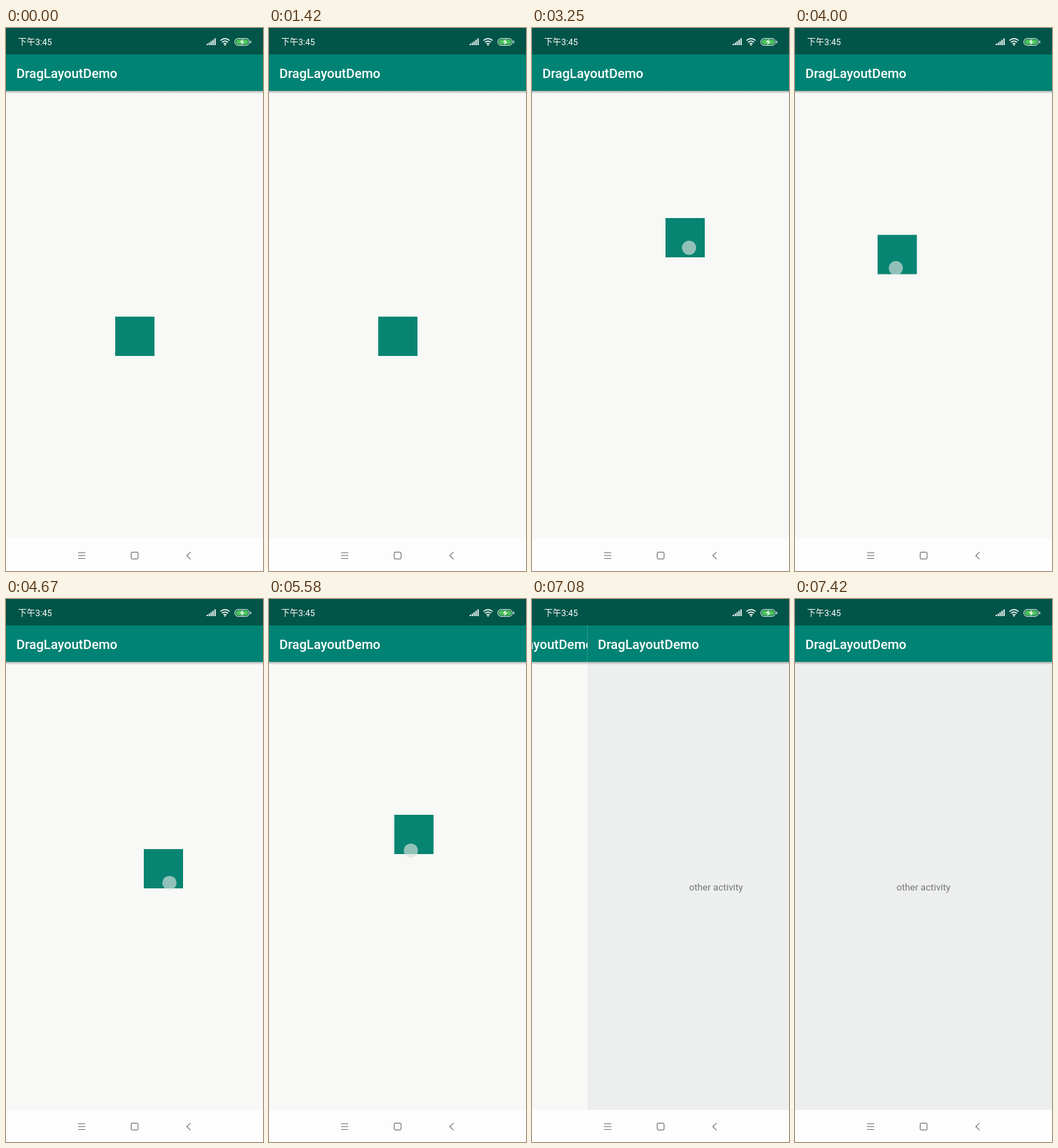
Animation, 360 px wide and 760 px high, one loop 8000 ms. Source, as an HTML page:

```html
<!DOCTYPE html>
<html lang="en">
<head>
<meta charset="utf-8">
<title>DragLayoutDemo</title>
<style>
  html, body { margin: 0; width: 100%; height: 100%; overflow: hidden; }
  svg { display: block; width: 360px; height: 760px; }
  text { font-family: Roboto, "Noto Sans CJK SC", "Noto Sans CJK", sans-serif; }
  .title { font-size: 18.3px; font-weight: 500; fill: #fff; }
  .time { font-size: 12px; fill: #fff; }
  .label { font-size: 13.2px; fill: #767676; text-anchor: middle; }
  .line { fill: none; stroke: #7c7c7e; stroke-width: 1.2; }
</style>
</head>
<body>
<svg viewBox="0 0 360 760">
  <defs>
    <linearGradient id="shade" x2="0" y2="1">
      <stop stop-color="#444" stop-opacity=".4"/>
      <stop offset="1" stop-color="#444" stop-opacity="0"/>
    </linearGradient>
    <g id="appBar">
      <rect y="88" width="360" height="4" fill="url(#shade)"/>
      <rect y="37" width="360" height="51" fill="#008374"/>
      <text class="title" x="14.5" y="70">DragLayoutDemo</text>
    </g>
  </defs>

  <g id="main">
    <rect width="360" height="760" fill="#f8f8f6"/>
    <use href="#appBar"/>
    <rect id="tile" width="55" height="55" fill="#078572"/>
    <circle id="touch" r="10" fill="#dce2df"/>
  </g>

  <g id="other">
    <rect width="360" height="760" fill="#ecefed"/>
    <use href="#appBar"/>
    <text class="label" x="180" y="408">other activity</text>
  </g>

  <g id="statusBar">
    <rect width="360" height="37" fill="#005548"/>
    <text class="time" x="17" y="24">下午3:45</text>
    <path d="M282 24v-2M284.7 24v-3.5M287.4 24v-5.5M290.1 24v-7.5M292.8 24v-9.5" stroke="#fff" stroke-width="1.7"/>
    <path d="M300.3 17.5q6.5-5.5 13 0M302.5 20q4.3-3.5 8.6 0M304.7 22.3q2.1-1.6 4.2 0" fill="none" stroke="#fff" stroke-width="1.4"/>
    <circle cx="306.8" cy="23.8" r="1" fill="#fff"/>
    <rect x="320.7" y="14.7" width="20" height="9.6" rx="4.2" fill="#0f6a50" stroke="#e8f2ee"/>
    <rect x="322.3" y="16.3" width="16.8" height="6.4" rx="2.8" fill="#4cc35a"/>
    <path d="M342.7 17.8v3.4" stroke="#e8f2ee" stroke-width="1.3"/>
    <path d="M332 15.3l-4.5 4.8h3l-1.2 3.8 4.7-5h-3z" fill="#fff"/>
  </g>

  <g id="navBar">
    <rect y="715" width="360" height="45" fill="#fdfdfe"/>
    <path class="line" d="M101 734.5h10M101 738.5h10M101 742.5h10" style="stroke-width:1"/>
    <rect class="line" x="175.4" y="733.6" width="9.6" height="9.6" rx="1.8"/>
    <path class="line" d="M258.5 733.3l-5.2 5.2 5.2 5.2"/>
  </g>
</svg>

<script>
const LOOP = 8000, FPS = 12;

// Times are in ticks of 1/12 s
const DRAG = { from: 21, to: 77 }, TAP = { from: 80, to: 84 }, SLIDE = { from: 83, to: 88 };

// Turning points of the drag: tick, x, y
const path = [
  [21, 153, 404], [29, 146.5, 411.5], [32, 134, 413], [39, 187, 266],
  [42, 238, 255], [51, 74, 309], [56, 193, 350], [58, 240, 390],
  [61, 170, 522], [65, 246, 330], [67, 175.5, 302], [70, 106, 452], [77, 158, 453.5]
];

const $ = id => document.getElementById(id);
const clamp = (v, low, high) => Math.max(low, Math.min(high, v));
const place = (node, x, y) => node.setAttribute('transform', `translate(${x} ${y})`);

// Catmull-Rom curve from b to c
function spline(a, b, c, d, u) {
  return b + u * (c - a + u * (2 * a - 5 * b + 4 * c - d + u * (3 * (b - c) + d - a))) / 2;
}

function tileAt(tick) {
  const last = path.length - 1;
  const t = clamp(tick, path[0][0], path[last][0]);
  const i = Math.max(1, path.findIndex(p => p[0] >= t));
  const near = [i - 2, i - 1, i, i + 1].map(n => path[clamp(n, 0, last)]);
  const u = (t - near[1][0]) / (near[2][0] - near[1][0]);
  return [1, 2].map(axis => spline(...near.map(p => p[axis]), u));
}

// The tile trails the finger, so the finger leads with the speed
function fingerAt(tick) {
  if (tick >= TAP.from) return [185, 483];
  const before = tileAt(tick - 0.5), after = tileAt(tick + 0.5), tile = tileAt(tick);
  return [30, 45].map((grip, k) => tile[k] + grip + 0.2 * (after[k] - before[k]));
}

function draw(ms) {
  const tick = Math.floor((ms + 4) * FPS / 1000);
  const during = span => tick >= span.from && tick < span.to;
  place($('tile'), ...tileAt(tick));
  place($('touch'), ...fingerAt(tick));
  $('touch').setAttribute('opacity', during(DRAG) ? 0.65 : during(TAP) ? 0.35 : 0);

  const progress = clamp((tick - SLIDE.from) / (SLIDE.to - SLIDE.from), 0, 1);
  const left = (1 - progress) ** 3;
  place($('other'), 360 * left, 0);
  place($('main'), -90 * (1 - left), 0);
}

function loop() {
  draw(performance.now() % LOOP);
  requestAnimationFrame(loop);
}
loop();
</script>
</body>
</html>
```
